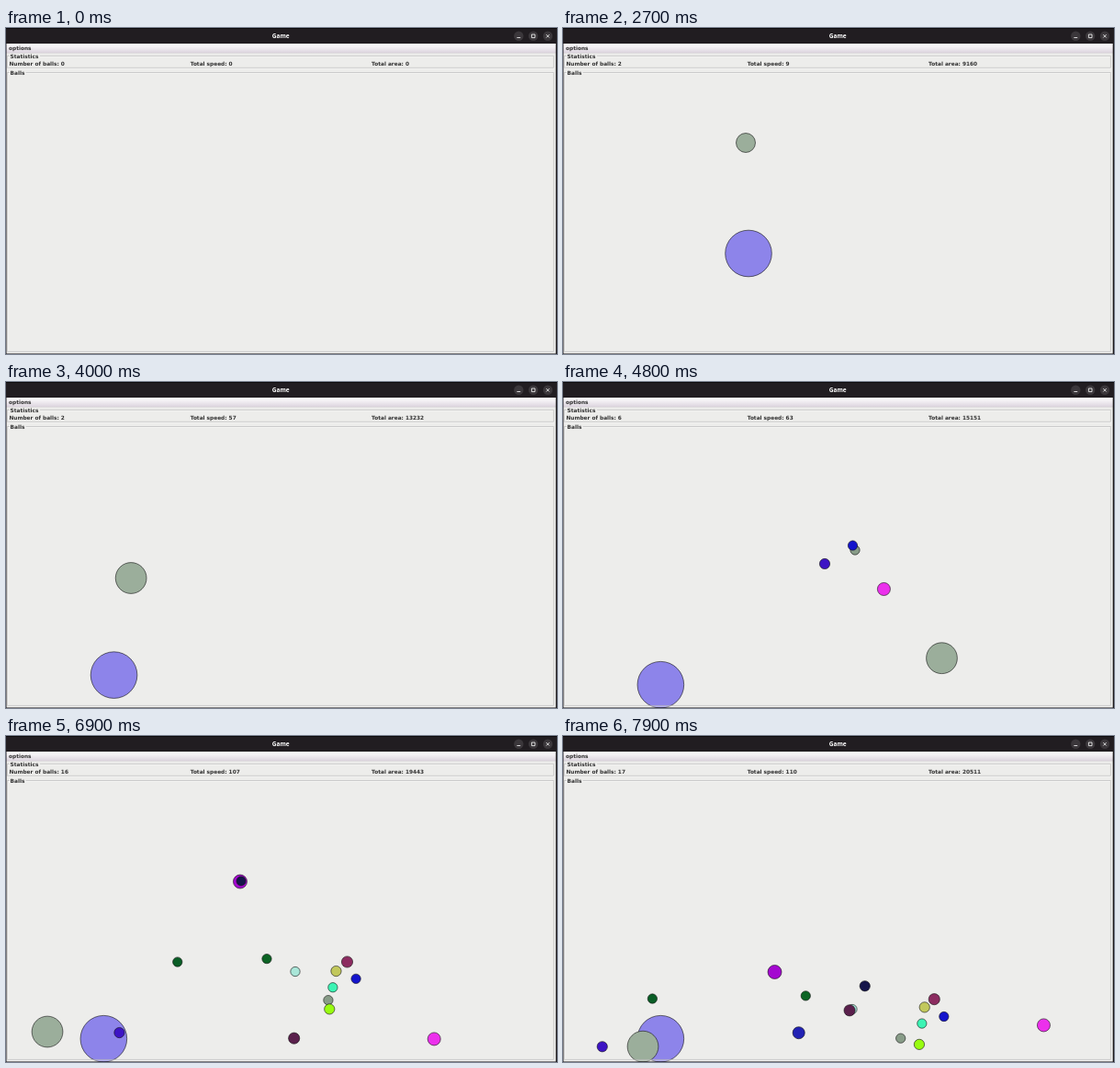
An HTML page that plays this animation: 600x355 px, repeating every 8000 ms.

```html
<!DOCTYPE html>
<html lang="en">
<head>
<meta charset="utf-8">
<title>Game</title>
<style>
  html, body { margin: 0; width: 100%; height: 100%; overflow: hidden; background: #ededeb; }
  svg { display: block; width: 100vw; height: 100vh; }
  text { font: bold 5.82px "DejaVu Sans", sans-serif; fill: #333; }
  #title { font: bold 6.5px "Noto Sans", sans-serif; fill: #fff; text-anchor: middle; }
  .etch { fill: none; stroke-width: .6; }
</style>
</head>
<body>
<svg viewBox="0 0 600 355" preserveAspectRatio="none">
  <defs>
    <linearGradient id="menu" x2="0" y2="1">
      <stop offset="0" stop-color="#fff"/>
      <stop offset="1" stop-color="#ddd5df"/>
    </linearGradient>
  </defs>
  <rect width="600" height="355" fill="#ededeb"/>
  <rect width="600" height="17" fill="#211d21"/>
  <rect width="600" height="1" fill="#0c0a0c"/>
  <text id="title" x="299.3" y="11.2">Game</text>
  <g fill="#3b373b">
    <circle cx="558.3" cy="8.8" r="5.2"/>
    <circle cx="574.2" cy="8.8" r="5.2"/>
    <circle cx="590" cy="8.8" r="5.2"/>
  </g>
  <path d="M556.4 10.5h3.8M572.4 7h3.6v3.6h-3.6zM588.3 7.1l3.4 3.4m0-3.4l-3.4 3.4" fill="none" stroke="#fff" stroke-width=".8"/>
  <rect y="17" width="599" height="10" fill="url(#menu)"/>
  <path d="M0 27.2H599" stroke="#c9c5ca" stroke-width=".5"/>
  <text x="3" y="24.2">options</text>

  <g id="balls" stroke="#111" stroke-width=".6"></g>

  <g class="etch">
    <path d="M37 31H597V43.9H2V31H4M21.5 49.1H597V353.1H2V49.1H4" stroke="#fff"/>
    <path d="M37 30.4H596.4V43.3H1.4V30.4H4M21.5 48.5H596.4V352.4H1.4V48.5H4" stroke="#b3b3b2"/>
  </g>
  <text x="4.6" y="33.2">Statistics</text>
  <text x="4.6" y="51.2">Balls</text>
  <text id="count" x="3.4" y="41.3"></text>
  <text id="speed" x="200.7" y="41.3"></text>
  <text id="area" x="398" y="41.3"></text>
  <path d="M0 17H.5V354.5H598.7V17H600V355H0z" fill="#1a171a"/>
</svg>
<script>
const LOOP = 8000, STEP = 100;
const SCALE = 600 / 1280;          // window units to stage pixels
const GROWTH = 68;                 // radius gained per second while held
const WIDTH = 598, FLOOR = 355;
const STALL = { at: 5.2, lag: 0.6 };
const EPS = 1e-6;

const layer = document.getElementById('balls');
const balls = [];

// A ball is held, growing, until its release and then flies freely.
function ball(color, radius, release, spot, vx, extra) {
  const node = document.createElementNS('http://www.w3.org/2000/svg', 'circle');
  node.setAttribute('fill', color);
  layer.append(node);
  const [x, y] = spot;
  balls.push({
    node, radius, release, x, y, vx,
    vy: 0, hold: 0.03, gravity: 694, bounce: 0.79, grip: 0.8, ...extra
  });
}

ball('#8d84ea', 54, 1.7, [293, 133], -91, { vy: 56, hold: 0.5, gravity: 113, bounce: 0.28, grip: 0.57 });
ball('#9bae9b', 36, 2.9, [199, 125], 836, { vy: 200, hold: 0.5, bounce: 0.72 });

const middle = [315, 178];
ball('#ec30ec', 15, 4.43, middle, 93);
ball('#3d14c4', 12, 4.56, middle, -125);
ball('#889c88', 11, 4.68, middle, 25);
ball('#1414cc', 11, 4.79, middle, 49);

const burst = [
  ['#a9e6d8', 11, 0], ['#8c2c60', 13, 46], ['#0c6424', 11, -27], ['#0a5e26', 11, -120],
  ['#c2c85c', 12, 45], ['#3cf4b4', 11, 45], ['#98fc10', 12, 45]
];
burst.forEach(([color, radius, vx], i) => ball(color, radius, 4.84 + i * 0.1, middle, vx));
ball('#5a204c', 13, 5.64, middle, -2);

const upper = [256, 158];
ball('#a408d0', 16, 6.26, upper, -26);
ball('#15154a', 12, 6.32, upper, 78);
ball('#2222b4', 14, 6.61, upper, 1);

// Total speed shown at a few moments; it drifts between them.
const speeds = [[1.7, 0], [2.7, 9], [2.9, 57], [4, 57], [4.8, 63], [6.1, 138], [6.9, 107], [7.9, 110]];

function speedAt(t) {
  const i = speeds.findIndex(p => p[0] > t);
  if (i <= 0) return i ? speeds.at(-1)[1] : 0;
  const [t0, a] = speeds[i - 1], [t1, b] = speeds[i];
  return Math.round(a + (b - a) * (t - t0) / (t1 - t0));
}

// Fold a straight run into the space between the side walls.
function fold(x, r) {
  const span = WIDTH - 2 * r;
  const d = (((x - r) % (2 * span)) + 2 * span) % (2 * span);
  return r + (d > span ? 2 * span - d : d);
}

// Hop from landing to landing until the flight holding this moment.
function locate(b, time, r) {
  const floor = FLOOR - r, g = b.gravity;
  let { x, y, vx, vy } = b;
  let left = Math.max(0, time - b.release);
  while (true) {
    const flight = (-vy + Math.sqrt(vy * vy + 2 * g * (floor - y))) / g;
    if (left < flight) {
      return [fold(x + vx * left, r), y + vy * left + g / 2 * left * left];
    }
    left -= flight;
    x += vx * flight;
    y = floor;
    vy = -(vy + g * flight) * b.bounce;
    vx *= b.grip;
    if (-2 * vy / g < 0.33) return [fold(x, r), floor];
  }
}

function setText(id, label, value) {
  document.getElementById(id).textContent = `${label}: ${Math.floor(value)}`;
}

function draw(ms) {
  const t = Math.floor(ms % LOOP / STEP) * STEP / 1000 + EPS;
  const time = t < STALL.at ? t : Math.max(STALL.at, t - STALL.lag);
  let count = 0, area = 0;
  for (const b of balls) {
    const alive = time >= b.release - b.hold;
    b.node.style.display = alive ? '' : 'none';
    if (!alive) continue;
    count++;
    if (time >= b.release) area += Math.PI * b.radius ** 2;
    const held = Math.max(0, b.release - time);
    const [x, y] = locate(b, time, b.radius * SCALE);
    b.node.setAttribute('cx', x.toFixed(2));
    b.node.setAttribute('cy', y.toFixed(2));
    b.node.setAttribute('r', (Math.max(10, b.radius - held * GROWTH) * SCALE).toFixed(2));
  }
  setText('count', 'Number of balls', count);
  setText('speed', 'Total speed', speedAt(t));
  setText('area', 'Total area', area);
}

function tick() {
  draw(performance.now());
  requestAnimationFrame(tick);
}
tick();
</script>
</body>
</html>
```
